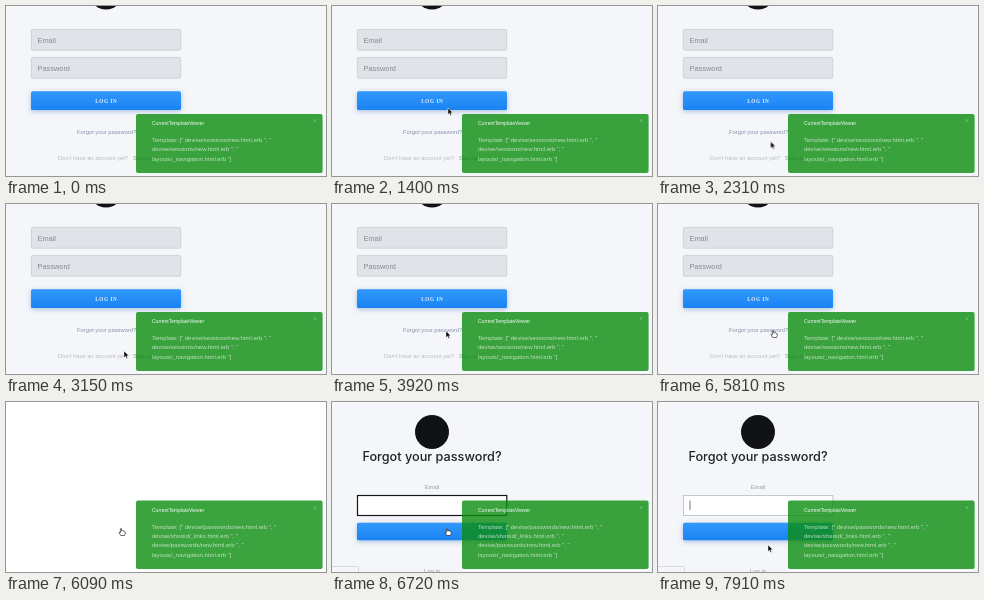
An HTML page for the animation above (8 s loop, 320 by 170 pixels).

```html
<!DOCTYPE html>
<html lang="en">
<head>
<meta charset="utf-8">
<title>Login flow</title>
<style>
html, body { margin: 0; width: 100%; height: 100%; overflow: hidden; background: #fff; }
svg { display: block; width: 320px; height: 170px; font-family: "Liberation Sans", Arial, sans-serif; }
text { white-space: pre; }

.login, .reset, .toast-reset, .status, .arrow, .hand, .beam, .caret {
  animation: 8s step-end infinite;
}
.login { animation-name: login; }
.reset { animation-name: reset; }
.toast-reset { animation-name: toast; }
.status { animation-name: status; }
.arrow { animation-name: arrow; }
.hand { animation-name: hand; }
.beam { animation-name: beam; }
.caret { animation-name: caret; }
.input { animation: focus 8s linear infinite; }
.cursor { animation: move 8s linear infinite; }

@keyframes login { 0% { visibility: visible } 76.125%, 100% { visibility: hidden } }
@keyframes toast { 0% { visibility: hidden } 76.125%, 100% { visibility: visible } }
@keyframes status { 0% { visibility: hidden } 82.25%, 100% { visibility: visible } }
@keyframes reset { 0% { visibility: hidden } 84%, 100% { visibility: visible } }
@keyframes caret { 0% { visibility: hidden } 96.25%, 100% { visibility: visible } }
@keyframes arrow {
  0% { visibility: hidden }
  7% { visibility: visible }
  52.5% { visibility: hidden }
  96.25%, 100% { visibility: visible }
}
@keyframes hand { 0% { visibility: hidden } 52.5% { visibility: visible } 86.6%, 100% { visibility: hidden } }
@keyframes beam { 0% { visibility: hidden } 86.6% { visibility: visible } 96.25%, 100% { visibility: hidden } }
@keyframes focus {
  0%, 90.1% { stroke: #15171a; stroke-width: 1.2px }
  92.75%, 100% { stroke: #c3c8d0; stroke-width: 1px }
}
@keyframes move {
  0%, 7% { transform: translate(126px, 98px) }
  7.875%, 9.6% { transform: translate(110px, 96px) }
  13% { transform: translate(108px, 122px) }
  17.5%, 20% { transform: translate(116px, 102px) }
  20.125%, 21.875% { transform: translate(116.5px, 102px) }
  26% { transform: translate(111px, 124px) }
  31.5%, 32.3% { transform: translate(114px, 146px) }
  35% { transform: translate(121px, 149px) }
  37.6%, 44.6% { transform: translate(118px, 147px) }
  49%, 52.4% { transform: translate(114px, 127px) }
  52.5%, 84.8% { transform: translate(115px, 126px) }
  87.5%, 96.2% { transform: translate(116px, 104px) }
  97.125%, 100% { transform: translate(110px, 143px) }
}
.toast { fill: #0b8e0e; fill-opacity: .8; }
.note { font-size: 5.95px; fill: #fff; fill-opacity: .68; }
.small { font-size: 5.8px; fill: #959aa3; }
.faint { fill: #b8bbc1; }
.link { fill: #8791a6; }
</style>
</head>
<body>
<svg viewBox="0 0 320 170">
  <defs>
    <linearGradient id="blue" x2="0" y2="1">
      <stop stop-color="#3198fb"/>
      <stop offset="1" stop-color="#1c83f3"/>
    </linearGradient>
    <filter id="soft" x="-10%" y="-60%" width="120%" height="240%">
      <feDropShadow dx="0" dy="1.5" stdDeviation="2.6" flood-color="#5b86bd" flood-opacity=".5"/>
    </filter>
    <g id="heading">
      <text y="2" font-size="5" fill="#fff" fill-opacity=".95">CurrentTemplateViewer</text>
      <path d="M161.7-3.7l2.6 2.6m0-2.6l-2.6 2.6" stroke="#8fcb90" stroke-width=".6"/>
    </g>
  </defs>

  <rect width="320" height="170" fill="#fff"/>

  <g class="login">
    <rect width="320" height="170" fill="#f4f6fa"/>
    <circle cx="100" cy="-13.5" r="17" fill="#111214"/>
    <g fill="#e1e3e9" stroke="#cdd0d8" stroke-width=".9">
      <rect x="25.4" y="23.4" width="149.3" height="20.8" rx="1"/>
      <rect x="25.4" y="51.4" width="149.3" height="20.8" rx="1"/>
    </g>
    <g font-size="7.4" fill="#858a93">
      <text x="31.5" y="36.7">Email</text>
      <text x="31.5" y="64.7">Password</text>
    </g>
    <rect x="25" y="85.2" width="150" height="18.8" rx="1.5" fill="url(#blue)" filter="url(#soft)"/>
    <text x="100.3" y="96.6" font-family="'Liberation Serif', serif" font-weight="700" font-size="5.2" letter-spacing=".6" text-anchor="middle" fill="#e6f1ff">LOG IN</text>
    <text class="small link" x="71" y="128.2">Forgot your password?</text>
    <text class="small faint" x="52" y="154">Don't have an account yet?</text>
    <text class="small link" x="127" y="154">Sign up</text>
    <rect class="toast" x="130" y="108" width="186.6" height="59" rx="2"/>
    <use href="#heading" x="146" y="117"/>
    <g class="note">
      <text x="146" y="136">Template: [" devise/sessions/new.html.erb ", "</text>
      <text x="146" y="145.2">devise/sessions/new.html.erb ", "</text>
      <text x="146" y="154.5">layouts/_navigation.html.erb "]</text>
    </g>
  </g>

  <g class="reset">
    <rect width="320" height="170" fill="#f4f6fa"/>
    <circle cx="100" cy="30" r="17" fill="#111214"/>
    <text x="100" y="58.6" font-family="Inter, sans-serif" font-weight="500" font-size="12.7" text-anchor="middle" fill="#1f2227">Forgot your password?</text>
    <text class="small" x="100" y="87.2" text-anchor="middle">Email</text>
    <rect class="input" x="25.5" y="93.5" width="149.3" height="20" fill="#fff"/>
    <path class="caret" d="M32 98.5v9.5" stroke="#555" stroke-width=".8"/>
    <rect x="25" y="120.8" width="150" height="17.5" rx="1.5" fill="url(#blue)" filter="url(#soft)"/>
    <text class="small" x="100" y="170.5" text-anchor="middle">Log in</text>
  </g>

  <path class="status" d="M-1 164.5H25.5q1 0 1 1V171H-1z" fill="#f5f6f9" stroke="#cfd1d5" stroke-width=".8"/>

  <g class="toast-reset">
    <rect class="toast" x="130" y="98.5" width="186.6" height="68.5" rx="2"/>
    <use href="#heading" x="146" y="108"/>
    <g class="note">
      <text x="146" y="127">Template: [" devise/passwords/new.html.erb ", "</text>
      <text x="146" y="136.2">devise/shared/_links.html.erb ", "</text>
      <text x="146" y="145.4">devise/passwords/new.html.erb ", "</text>
      <text x="146" y="154.6">layouts/_navigation.html.erb "]</text>
    </g>
  </g>

  <g class="cursor">
    <path class="arrow" d="M0 0V6.6L1.5 5.2 2.6 7.6 3.7 7.1 2.7 4.8H4.8Z" fill="#000" stroke="#fff" stroke-width=".5"/>
    <path class="hand" d="M-.6.8Q0-.3.7.8V3Q1.5 2.4 2 3.1 2.8 2.6 3.2 3.4 4.2 3.1 4.2 4.2V5.6L3.4 7.6H-.2L-2 4.6Q-1.7 3.6-.6 4.6Z" fill="#fff" stroke="#111" stroke-width=".65" stroke-linejoin="round"/>
    <path class="beam" d="M-1.3-4.4Q0-4.4 0-3.4 0-4.4 1.3-4.4M0-3.4V3.4M-1.3 4.4Q0 4.4 0 3.4 0 4.4 1.3 4.4" fill="none" stroke="#222" stroke-width=".7"/>
  </g>
</svg>
</body>
</html>
```
